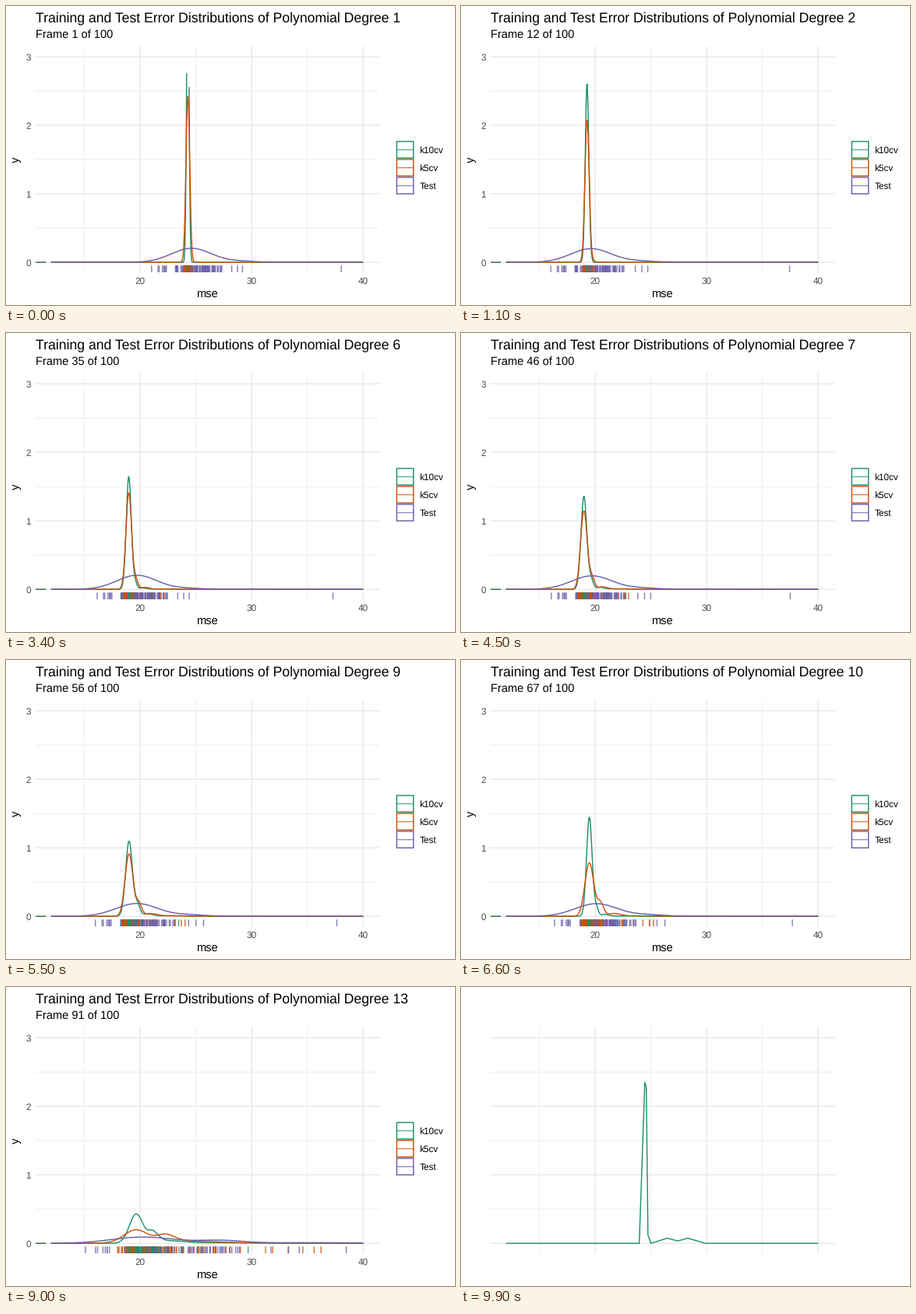
A matplotlib script for the animation above (10000 ms loop, 576 by 384 pixels).

```python
import numpy as np
import matplotlib.pyplot as plt
from matplotlib.animation import FuncAnimation
from matplotlib.collections import LineCollection
from matplotlib.colors import to_rgba
from matplotlib.patches import Rectangle

W, H, DPI = 576, 384, 96
FRAMES, STATES, SAMPLES = 100, 14, 100
LEFT, RIGHT, TOP, BOTTOM = 38, 478.3, 52.2, 342
NAMES = ("k10cv", "k5cv", "Test")
COLORS = ("#1B9069", "#CE5004", "#685EAA")
GRID, GREY = "#E8E8E8", "#4D4D4D"
plt.rcParams.update({"font.family": "Liberation Sans", "path.snap": False,
                     "text.hinting": "none"})

# Where each peak sits and how tall it is, at a few degrees.
KEYS = [1, 2, 4, 5, 9, 10, 12, 14]
CV_CENTRE = [24.27, 19.25, 19.37, 18.97, 19, 19.47, 19.55, 19.7]
TEST_CENTRE = [24.6, 19.6, 19.8, 19.7, 19.7, 20.1, 19.9, 20.4]
K10_PEAK = [4.5, 2.8, 2, 1.8, 1.03, 1.45, .67, .35]
K5_PEAK = [2.42, 2.2, 1.65, 1.55, .85, .78, .315, .16]
TEST_PEAK = [.205, .2, .2, .21, .185, .185, .11, .085]

xs = np.linspace(12, 40, 512)
rng = np.random.default_rng(7)


def px(x):
    return 172.2 + (np.asarray(x) - 20) * 14.3


def py(y):
    return 329.2 - 88 * np.asarray(y)


def bell(centre, spread):
    return np.exp(-((xs - centre) / spread) ** 2 / 2)


def density(centre, peak, scale, power):
    """A main peak; the area it leaves over trails off in ever wider bumps."""
    spread = scale * peak ** -power
    root = np.sqrt(2 * np.pi)
    rest = max(0, 1 - peak * spread * root)
    curve = peak * bell(centre, spread)
    for k, share in enumerate((.58, .28, .14)):
        reach = 2.5 * 2.2 ** k * spread
        width = .28 * reach
        curve += rest * share / (width * root) * bell(centre + reach, width)
    return curve


def series(centres, peaks, scale, power):
    degrees = np.arange(1, STATES + 1)
    mid = np.interp(degrees, KEYS, centres)
    top = np.exp(np.interp(degrees, KEYS, np.log(peaks)))
    return np.array([density(m, t, scale, power) for m, t in zip(mid, top)])


def samples(curves):
    """The same draws for every degree, a little tighter than the smooth curve."""
    u = rng.random(SAMPLES)
    cdfs = np.cumsum(curves + 1e-9, axis=1)
    x = np.array([np.interp(u, c / c[-1], xs) for c in cdfs])
    mode = xs[curves.argmax(axis=1)][:, None]
    return mode + .93 * (x - mode)


curves = [series(CV_CENTRE, K10_PEAK, .33, .75),
          series(CV_CENTRE, K5_PEAK, .33, .75),
          series(TEST_CENTRE, TEST_PEAK, .75, .55)]
order = rng.permutation(SAMPLES * len(curves))
rugs = np.hstack([samples(c) for c in curves])[:, order]
rug_colors = [to_rgba(COLORS[i // SAMPLES], .8) for i in order]
for c in curves:
    c[c > 3] = np.nan

fig = plt.figure(figsize=(W / DPI, H / DPI), dpi=DPI, facecolor="white")
ax = fig.add_axes([0, 0, 1, 1])
ax.set(xlim=(0, W), ylim=(H, 0))
ax.axis("off")


def pts(pixels):
    return pixels * 72 / DPI


def line(x, y, color, width=1.42, z=3, **kw):
    return ax.plot(x, y, color=color, lw=pts(width), zorder=z, **kw)[0]


def label(x, y, s, size, color="black", **kw):
    return ax.text(x, y, s, fontsize=size, color=color, **kw)


def grid_line(x, y, major):
    line(x, y, GRID, 1.42 if major else .75, 2 if major else 1)


for v in range(15, 41, 5):
    grid_line([px(v)] * 2, [TOP, BOTTOM], v % 10 == 0)
for v in np.arange(0, 3.1, .5):
    grid_line([LEFT, RIGHT], [py(v)] * 2, v % 1 == 0)

densities = [line([], [], c, z=4 + i, solid_capstyle="butt") for i, c in enumerate(COLORS)]
rug = LineCollection([], colors=rug_colors, linewidths=pts(1.42), zorder=8)
ax.add_collection(rug)
title = label(37.5, 20, "", 13.2)
subtitle = label(37.5, 42, "", 11)

# Everything the unfinished closing image lacks.
extras = [densities[1], densities[2], rug, title, subtitle,
          line([LEFT, LEFT + 13.2], [py(0)] * 2, "#2E6B3A", z=8, solid_capstyle="butt"),
          label(258, 374, "mse", 11, ha="center"),
          label(17.6, 197, "y", 11, rotation=90, rotation_mode="anchor", ha="center")]
extras += [label(px(v), 357, v, 8.8, GREY, ha="center") for v in (20, 30, 40)]
extras += [label(31.7, py(v) + 4.3, v, 8.8, GREY, ha="right") for v in range(4)]
for i, (name, c) in enumerate(zip(NAMES, COLORS)):
    y = 184.6 + 23.04 * i
    box = Rectangle((501.3, y - 10.6), 21.4, 21.2, fill=False, ec=c, lw=pts(1.42))
    extras += [ax.add_patch(box),
               line([502.5, 521.5], [y, y], c, alpha=.7),
               label(530.7, y + 4.3, name, 8.8)]

CLOSING = np.array([(12, 0), (23.95, 0), (24.45, 2.35), (24.58, 2.28), (24.73, .12), (25, 0),
                    (26.45, .075), (27.4, .035), (28.3, .075), (29.9, 0), (40, 0)])


def blend(a, b, w):
    return a + (b - a) * w if w else a


def update(i):
    last = i == FRAMES - 1
    for artist in extras:
        artist.set_visible(not last)
    if last:
        x, y = CLOSING.T
        densities[0].set_data(px(x), py(y))
        return

    # Each degree rests for a third of its time, then melts into the next.
    phase = i * STATES / FRAMES
    a = int(phase)
    b = (a + 1) % STATES
    w = np.clip((phase - a - 1 / 3) * 1.5, 0, 1)
    for artist, c in zip(densities, curves):
        y = blend(c[a], c[b], w)
        keep = np.isfinite(y) | (w == 0)
        artist.set_data(px(xs[keep]), py(y[keep]))
    marks = px(blend(rugs[a], rugs[b], w))
    rug.set_segments([[(x, 333.3), (x, BOTTOM)] for x in marks])
    degree = (b if w >= .5 else a) + 1
    title.set_text(f"Training and Test Error Distributions of Polynomial Degree {degree}")
    subtitle.set_text(f"Frame {i + 1} of {FRAMES}")


anim = FuncAnimation(fig, update, frames=FRAMES, interval=100, init_func=lambda: update(0),
                     repeat=True, repeat_delay=0, blit=False)
plt.show()
```
